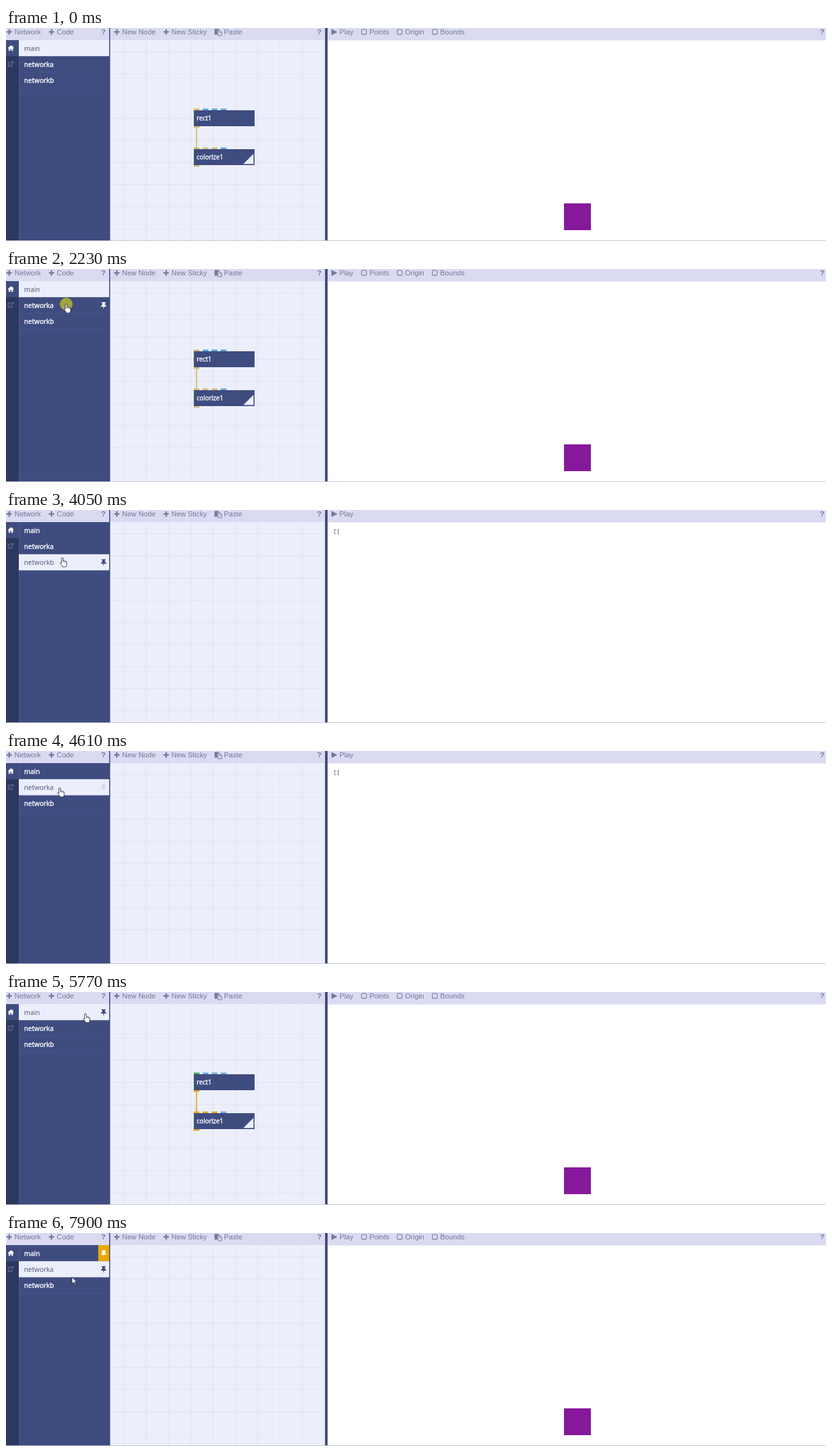
Animation, 1280 px wide and 334 px high, one loop 8000 ms. Source, as an HTML page:

```html
<!DOCTYPE html>
<html lang="en">
<head>
<meta charset="utf-8">
<title>Network editor</title>
<style>
html, body { margin: 0; width: 100%; height: 100%; overflow: hidden; background: #fff; }
svg { display: block; }
text { white-space: pre; }
.bar { font: 11.2px "Liberation Sans", Arial, sans-serif; fill: #74789a; }
.help { font: bold 11.5px "Liberation Sans", Arial, sans-serif; fill: #74789a; text-anchor: middle; }
.label { font: 10.4px "Noto Sans", "Open Sans", sans-serif; }
.strong { fill: #fff; stroke: #fff; stroke-width: .35px; }
.soft { fill: #50587f; }
.node { font-size: 9.9px; }
.mono { font: 9px "Noto Sans Mono", "DejaVu Sans Mono", monospace; fill: #444; }
</style>
</head>
<body>
<svg id="stage" width="1280" height="334" viewBox="0 0 1280 334"></svg>
<script>
const LOOP = 8000;
const NAVY = '#3f4c80', PALE = '#eceffb', BAR = '#dadaf1', INK = '#74789a', AMBER = '#e9a800';
const ROWS = ['main', 'networka', 'networkb'];
const rowTop = i => 19 + i * 25.2;

const stage = document.getElementById('stage');
const rect = (x, y, w, h, fill, more = '') =>
  `<rect x="${x}" y="${y}" width="${w}" height="${h}" fill="${fill}" ${more}/>`;
const path = (d, fill, more = '') => `<path d="${d}" fill="${fill}" ${more}/>`;
const text = (x, y, cls, s, more = '') => `<text x="${x}" y="${y}" class="${cls}" ${more}>${s}</text>`;
const group = (id, body) => `<g id="${id}">${body}</g>`;

// Toolbar pieces
const plus = x => path(`M${x - 4.2} 6.2h8.4M${x} 2v8.4`, 'none', `stroke="${INK}" stroke-width="2.3"`);
const add = (x, s) => plus(x) + text(x + 8.3, 10.2, 'bar', s);
const check = (x, s) =>
  rect(x, 2.3, 7.6, 7.6, 'none', `rx="1.4" stroke="${INK}" stroke-width="1.1"`) + text(x + 12.3, 10.2, 'bar', s);
const help = x => text(x, 10.2, 'help', '?');
const pasteIcon = path('M325.5 1.5h7v2.2h-2.6v6.8h-4.4z', INK) +
  path('M330.8 4.5h3.4l2.6 2.6v4.9h-6z', BAR, `stroke="${INK}" stroke-width="1"`) +
  path('M334 4.5v2.8h2.8', 'none', `stroke="${INK}" stroke-width=".8"`);

function grid() {
  let d = '';
  for (let x = 184.3; x < 498; x += 34.75) d += `M${x} 19V333`;
  for (let y = 37.4; y < 333; y += 34.7) d += `M163 ${y}H498`;
  return path(d, 'none', 'stroke="#dfe2f0" stroke-width="1"');
}

function ports(y, kinds) {
  return kinds.map((k, i) => `<rect class="${k}" x="${293 + i * 14}" y="${y}" width="9" height="2.6"/>`).join('');
}

function node(y, name, kinds) {
  return ports(y - 2.6, kinds) + rect(293.2, y, 94.8, 25, NAVY) +
    text(297.5, y + 16.2, 'label strong node', name) + ports(y + 25, ['shape']);
}

const nodes = '<path class="wire" d="M297.4 156V188" fill="none" stroke-width="1.9"/>' +
  node(129, 'rect1', ['any', 'num', 'num', 'num']) +
  node(190, 'colorize1', ['shape', 'shape', 'shape', 'num']) +
  path('M370.5 213.3L386.4 197.2V213.3Z', PALE);

const PIN = 'M-3 -5H3V-3.8L2 -3.1L2.3 -.8Q4.1 0 4.2 1.9H.7L.2 5.2H-.2L-.7 1.9H-4.2Q-4.1 0 -2.3 -.8L-2 -3.1L-3 -3.8Z';

function row(i) {
  const y = rowTop(i);
  return rect(20, y, 141, 25.2, PALE, `id="fill${i}"`) +
    text(28.2, y + 16.5, 'label', ROWS[i], `id="name${i}"`) +
    (i ? '' : rect(144, 19, 17, 25, AMBER, 'id="badge"')) +
    path(PIN, '#fff', `id="pin${i}" transform="translate(152.4 ${y + 12.9})"`);
}

const homeIcon = path('M7.5 27L2.8 31.4L3.5 32.1L4.2 31.5V35.8H6.6V32.8H8.4V35.8H10.8V31.5L11.5 32.1L12.2 31.4L10.8 30.1V27.7H9.6V29Z', '#fff');
const exportIcon = path('M7.5 53.6H3.4V60.2H9.9V57.4M6 58L11.3 52.7M8.4 52.7H11.4V55.7', 'none',
  'stroke="#6f7ba6" stroke-width="1"');

const cursors =
  group('hand', path('M-1.4 1Q-1.3 -.3 -.1 -.3Q1.1 -.3 1.1 1V4.3Q2.5 3.8 3.1 5Q4.5 4.5 5.1 5.7Q6.8 5.3 6.9 7.2V9.9Q6.9 11.6 5.7 14H.5Q-.5 11.6 -2.9 9.2Q-3.7 7.8 -2.6 7.2L-1.4 8.1Z',
    '#fff', 'stroke="#15182c" stroke-width=".8" stroke-linejoin="round"') +
    path('M1.1 4.6V7M3.1 5.2V7.3M5.1 5.9V7.6', 'none', 'stroke="#15182c" stroke-width=".6"')) +
  group('arrow', path('M0 0V10.4L2.4 8.3L4.2 12.3L5.8 11.6L4.1 7.7H7.2Z', '#fff',
    'stroke="#15182c" stroke-width=".8" stroke-linejoin="round"'));

stage.innerHTML =
  '<style id="tint"></style>' +
  rect(0, 0, 1280, 334, '#fff') +
  rect(0, 19, 162, 315, NAVY) + rect(0, 44.2, 20, 290, '#2d385f') + rect(20, 19, 1, 315, '#4d598b') +
  rect(20, 69.2, 141, .8, '#4b588c') + rect(20, 94.2, 141, .8, '#4b588c') +
  ROWS.map((_, i) => row(i)).join('') + homeIcon + exportIcon +
  rect(162.5, 19, 336, 315, PALE) + grid() + group('nodes', nodes) +
  rect(0, 0, 1280, 19, BAR) + rect(502, 19, 778, .8, '#e6e6f5') +
  rect(161, 0, 1.6, 334, NAVY) + rect(498, 0, 4, 334, NAVY) +
  add(5, 'Network') + add(71, 'Code') + help(152) +
  add(173, 'New Node') + add(250, 'New Sticky') + pasteIcon + text(340.3, 10.2, 'bar', 'Paste') + help(489) +
  path('M508 1.4L517.3 6.2L508 11Z', INK) + text(520.6, 10.2, 'bar', 'Play') + help(1274) +
  group('preview', check(555, 'Points') + check(610.7, 'Origin') + check(665.5, 'Bounds') +
    rect(871, 275, 42, 42, '#86199b')) +
  text(510.6, 36.6, 'mono', '[]', 'id="empty"') +
  rect(0, 333, 1280, 1, '#c6c7d2') +
  '<circle id="press" r="10" fill="#ff0" fill-opacity=".5"/>' + cursors;

const part = id => document.getElementById(id);
const show = (id, on) => part(id).setAttribute('display', on ? 'inline' : 'none');

// Pointer moves: start, end, then evenly timed positions
const MOVES = [
  [1070, 1600, [68, 268], [75, 208], [90, 152], [100, 106], [105, 78], [104, 58], [102, 44], [101, 38]],
  [1910, 2070, [99, 44], [96, 51], [94, 55]],
  [2790, 2930, [92, 64], [89, 73], [88, 78]],
  [3970, 4320, [88, 75], [87, 69], [86, 63], [85, 59], [84, 58]],
  [4860, 4990, [84, 53], [84, 44], [85, 38]],
  [5640, 6000, [102, 36], [124, 34], [139, 33], [146, 33], [149, 33], [149.5, 33]],
  [6790, 6940, [111, 56], [106, 58], [104, 59]],
  [7840, 7900, [104, 64], [103, 69]]
];
const PRESSES = [[2230, 2390], [3180, 3340], [4390, 4610], [5240, 5390], [6240, 6390], [7120, 7200]];
const SELECTS = [[0, 0], [2390, 1], [3340, 2], [4610, 1], [5390, 0], [7200, 1]];
const PINNED_AT = 6390, ARROW_AT = 7900;

function pointer(t) {
  const move = MOVES.filter(m => t >= m[0]).pop();
  if (!move) return null;
  const [start, end, ...spots] = move;
  const last = spots.length - 1;
  const k = Math.floor((t - start + 5) / (end - start) * last);
  return spots[Math.min(last, k)];
}

function draw(t) {
  const [since, selected] = SELECTS.filter(s => t >= s[0]).pop();
  const spot = pointer(t);
  const hovered = spot ? Math.floor((spot[1] - 19) / 25.2) : -1;
  const pinned = t >= PINNED_AT;
  const fresh = since > 0 && t - since < 70;

  ROWS.forEach((_, i) => {
    const on = i === selected, marked = pinned && i === 0;
    show('fill' + i, on);
    part('name' + i).setAttribute('class', 'label ' + (on ? 'soft' : 'strong'));
    show('pin' + i, i === hovered || marked);
    part('pin' + i).setAttribute('fill', !on ? '#fff' : marked ? '#75633c' : fresh ? '#d6d8e7' : NAVY);
  });
  show('badge', pinned);

  const live = selected === 0 || pinned;
  show('nodes', selected === 0);
  show('preview', live);
  show('empty', !live);
  const vivid = t >= 5390;
  const warm = vivid ? '#e2a820' : '#d2bd76';
  const css = `.shape{fill:${warm}}.wire{stroke:${warm}}.any{fill:${vivid ? '#3fae49' : warm}}.num{fill:${vivid ? '#6fa8dc' : '#5aa4da'}}`;
  if (part('tint').textContent !== css) part('tint').textContent = css;

  const overRow = hovered >= 0 && hovered < ROWS.length && t < ARROW_AT;
  show('hand', spot && overRow);
  show('arrow', spot && !overRow);
  show('press', PRESSES.some(([a, b]) => t >= a && t < b));
  if (spot) {
    const at = `translate(${spot[0]} ${spot[1]})`;
    for (const id of ['hand', 'arrow', 'press']) part(id).setAttribute('transform', at);
  }
}

const begun = performance.now();
function tick() {
  draw((performance.now() - begun) % LOOP);
  requestAnimationFrame(tick);
}
draw(0);
requestAnimationFrame(tick);
</script>
</body>
</html>
```
